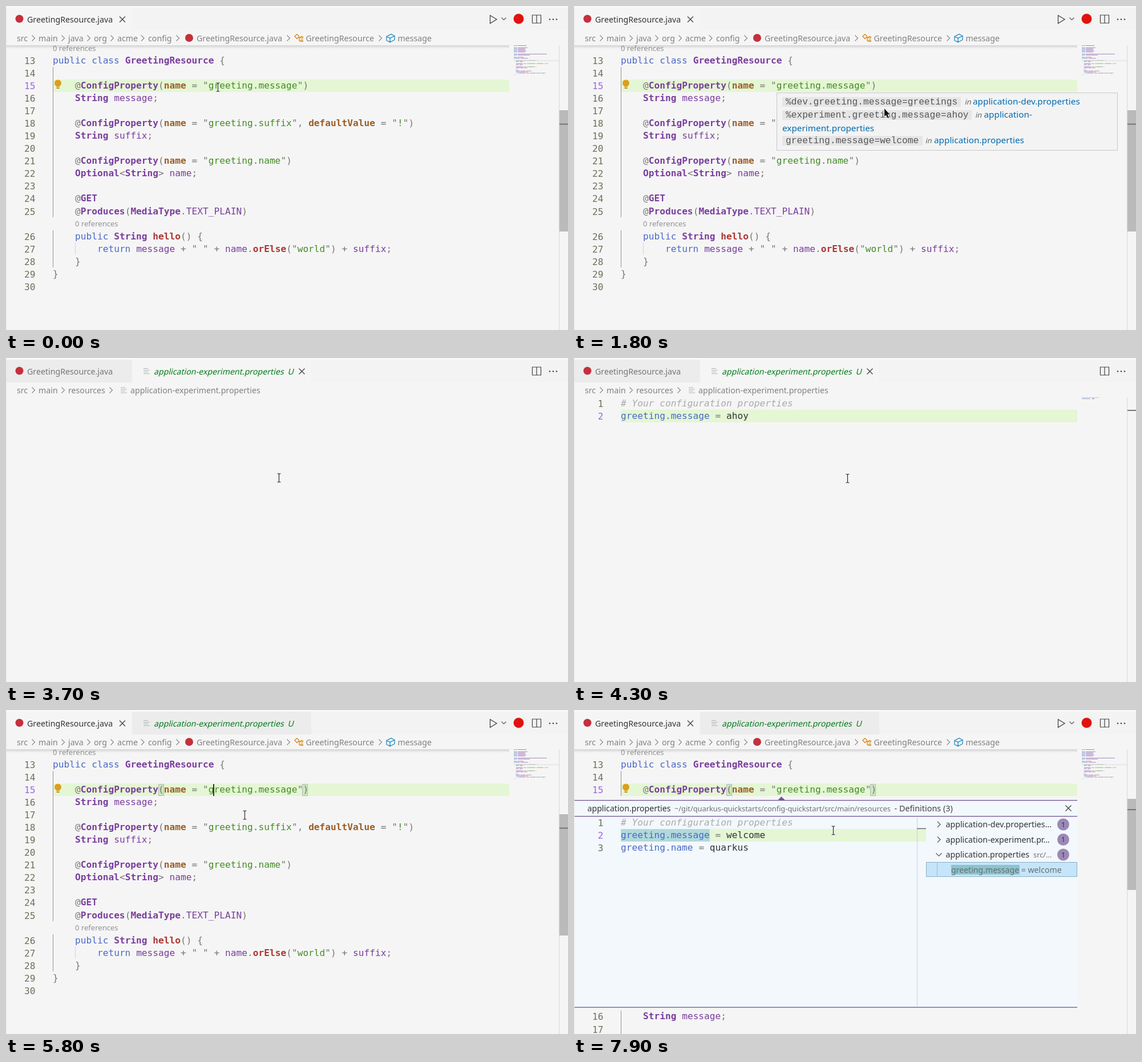
Recreate the animation shown at these times as an HTML page with a canvas. Size 985x569 px, loop 8 s.

```html
<!DOCTYPE html>
<html lang="en">
<head>
<meta charset="utf-8">
<title>Config property editor</title>
<style>
html, body { margin: 0; width: 100%; height: 100%; overflow: hidden; background: #f5f5f5; }
canvas { display: block; }
</style>
</head>
<body>
<canvas id="stage" width="985" height="569"></canvas>
<script>
const ctx = document.getElementById('stage').getContext('2d');
const UI = '"Noto Sans", "Open Sans", sans-serif';
const MONO = '"DejaVu Sans Mono", monospace';
const CODE = '"Liberation Mono", monospace';
const CH = 9.742, ROW = 22.06, LEFT = 82;
const PURPLE = '#705697', GREEN_ROW = '#e4f6d4', GREY = '#777777', BG = '#f5f5f5';

// Token styles: first letter of each "~" separated piece
const STYLES = {
  k: ['#4b69c6'], T: ['#7a3e9d', 'bold'], v: ['#7a3e9d'], p: [GREY],
  s: ['#448c27'], n: ['#9c5d27', 'bold'], f: ['#aa3731', 'bold'],
  c: ['#aaaaaa', 'italic'], x: ['#333333']
};
const config = (key, rest = '') =>
  `p    @~TConfigProperty~p(~nname~p = "~s${key}~p"${rest}~p)`;
const LINES = {
  13: 'kpublic class ~TGreetingResource~p {',
  15: config('greeting.message'),
  16: 'p    ~TString~v message~p;',
  18: config('greeting.suffix', ', ~ndefaultValue~p = "~s!~p"'),
  19: 'p    ~TString~v suffix~p;',
  21: config('greeting.name'),
  22: 'p    ~TOptional~p<~TString~p> ~vname~p;',
  24: 'p    @~TGET',
  25: 'p    @~TProduces~p(~TMediaType~p.~vTEXT_PLAIN~p)',
  26: 'p    ~kpublic ~TString ~fhello~p() {',
  27: 'p        ~kreturn ~vmessage~p + " " + ~vname~p.~forElse~p("~sworld~p") + ~vsuffix~p;',
  28: 'p    }',
  29: 'p}'
};
const COMMENT = 'c# Your configuration properties';
const pair = (key, value) => `k${key}~p = ~x${value}`;

function rect(x, y, w, h, color) {
  ctx.fillStyle = color;
  ctx.fillRect(x, y, w, h);
}

function frame(x, y, w, h, color) {
  ctx.strokeStyle = color;
  ctx.lineWidth = 1;
  ctx.strokeRect(x + .5, y + .5, w - 1, h - 1);
}

function disc(x, y, r, color) {
  ctx.fillStyle = color;
  ctx.beginPath();
  ctx.arc(x, y, r, 0, 7);
  ctx.fill();
}

function shape(path, x, y, stroke, fill, width = 1.2) {
  ctx.save();
  ctx.translate(x, y);
  const p = new Path2D(path);
  if (fill) { ctx.fillStyle = fill; ctx.fill(p); }
  if (stroke) { ctx.strokeStyle = stroke; ctx.lineWidth = width; ctx.stroke(p); }
  ctx.restore();
}

function text(str, x, y, color, size = 14.2, family = UI, weight = '') {
  ctx.font = `${weight} ${size}px ${family}`;
  ctx.fillStyle = color;
  ctx.fillText(str, x, y);
}

function slanted(str, x, y, color, size) {
  ctx.save();
  ctx.transform(1, 0, -.24, 1, x, y);
  text(str, 0, 0, color, size);
  ctx.restore();
}

function tokens(line, draw) {
  let col = 0;
  for (const part of line.split('~')) {
    const str = part.slice(1), [color, weight] = STYLES[part[0]];
    draw(str, col, color, weight);
    col += str.length;
  }
}

const codeLine = (line, y) => tokens(line, (str, col, color, weight) =>
  text(str, LEFT + col * CH, y, color, 16.18, MONO, weight));

function lineNumber(n, y, active) {
  ctx.textAlign = 'right';
  text(n, 51.5, y + .7, active ? '#9769dc' : '#6d705b', 16.18, MONO);
  ctx.textAlign = 'left';
}

const cross = (x, y) => shape('M-5 -5L5 5M5 -5L-5 5', x, y, '#424242', null, 1.3);
const chevron = (x, y, color = '#888') => shape('M-2.5 -5L2.5 0L-2.5 5', x, y, color);
const chevronDown = (x, y, s = 1, color = '#555') =>
  shape(`M${-5 * s} ${-2.5 * s}L0 ${2.5 * s}L${5 * s} ${-2.5 * s}`, x, y, color);
const fileIcon = (x, y) =>
  [8, 11, 8, 11].forEach((w, i) => rect(x, y + i * 3, w, 1, '#aeb4b6'));

function crumbs(names, arrows) {
  for (const [str, x] of names) text(str, x, 61.5, '#808080');
  for (const x of arrows) chevron(x, 56.5);
}

function header(javaActive, secondTab) {
  rect(0, 0, 985, 43, '#f3f3f3');
  rect(0, 0, 985, 3, '#f8f8f8');
  rect(1, 3, 220, 40, javaActive ? BG : '#ececec');
  disc(23.5, 22.5, 7, '#c4313c');
  text('GreetingResource.java', 37, 29, javaActive ? '#333' : '#747474');
  if (secondTab) {
    rect(221, 3, 314, 40, javaActive ? '#ececec' : BG);
    fileIcon(241, 18);
    slanted('application-experiment.properties', 259, 29, '#007a18');
    slanted('U', 493.5, 29, '#007a18');
  }
  cross(javaActive ? 204 : 518.5, 23.5);
  if (javaActive) {
    shape('M-5.5 -7L6 0L-5.5 7Z', 854, 23.5, '#424242', null, 1.3);
    chevronDown(872.5, 22.5, .8);
    disc(898.5, 22.5, 9, '#e0140f');
  }
  shape('M-7.5 -7H7.5V7H-7.5ZM0 -7V7', 930, 23, '#424242', null, 1.2);
  for (const x of [953, 959, 965]) disc(x, 23.5, 1.3, '#424242');
}

function javaCrumbs() {
  crumbs([['src', 19], ['main', 57], ['java', 109], ['org', 154], ['acme', 195],
    ['config', 249], ['GreetingResource.java', 334], ['GreetingResource', 525.5],
    ['message', 686.5]], [48, 100, 145, 186, 239.5, 301, 495, 656]);
  disc(321, 56, 7, '#c4313c');
  shape('M-7 -3L-3 -7L1 -3L-3 1ZM-1 -1H4M1 -1V5H4M4 -3L7 -3L7 0L4 0ZM4 3H7V6H4Z',
    513, 56.5, '#d67e00');
  shape('M-7 -3L1 -7L7 -4V3L-1 7L-7 4ZM-7 -3L-1 0L7 -4M-1 0V7', 674, 56.5, '#0a7fc0');
}

function minimap() {
  ctx.globalAlpha = .6;
  const heads = [22, 0, 24, 20, 20, 22, 20, 0, 58, 28, 0, 17];
  heads.forEach((w, i) => {
    const y = 69 + i * 1.86;
    rect(890, y, Math.min(w, 6), 1, '#4b69c6');
    rect(897, y, Math.max(0, w - 7), 1, '#7a3e9d');
  });
  for (const n in LINES) tokens(LINES[n], (str, col, color) => {
    const pad = str.length - str.trimStart().length;
    rect(890 + (col + pad) * .92, 69 + (n - 1) * 1.86, (str.length - pad) * .8, 1, color);
  });
  ctx.globalAlpha = 1;
  rect(890, 95.5, 79, 1, '#dcdcdc');
}

function scrollbar(top, bottom, mark, color = '#bababa') {
  rect(969, 69, 1, 500, '#d8d8d8');
  if (bottom) rect(970, top, 15, bottom - top, color);
  rect(970, mark, 15, 2, '#757575');
}

function bulb() {
  disc(91, 135.5, 6, '#dd9f1b');
  rect(88, 139, 6, 3, '#dd9f1b');
  rect(88.5, 143, 5, 2, '#b28a3a');
}

function bracket(x) {
  rect(x, 130, 10, 21, 'rgba(0,100,0,.1)');
  frame(x, 130, 10, 21, '#b9b9b9');
}

function javaEditor(t) {
  const peek = t >= 6600, focused = t >= 4700;
  javaCrumbs();
  rect(LEFT, 129.5, 800, 21.5, GREEN_ROW);
  rect(82, 107, 1, peek ? 44 : 264, '#949494');
  if (peek) rect(82, 528, 1, 41, '#949494');
  else {
    rect(82, 394, 1, 65, '#949494');
    rect(121, 415, 1, 22, '#d3d3d3');
    text('0 references', 121, 387, '#919191', 13.05);
  }
  text('0 references', 82, 79, '#919191', 13.05);
  if (focused) { bracket(267); bracket(519); }
  for (let n = 13; n <= (peek ? 17 : 30); n++) {
    const shift = peek && n > 15 ? 376.5 : n > 25 ? ROW : 0;
    const y = Math.round(100.8 + (n - 13) * ROW + shift);
    lineNumber(n, y, n === 15);
    if (LINES[n]) codeLine(LINES[n], y);
  }
  if (!focused || t >= 5500) bulb();
  const caret = t >= 4700 && t < 5100 || t >= 5600 && t < 6200;
  if (caret) rect(363, 130, 2, 21, '#333');
  const fade = ctx.createLinearGradient(0, 69, 0, 75);
  fade.addColorStop(0, 'rgba(0,0,0,.14)');
  fade.addColorStop(1, 'rgba(0,0,0,0)');
  rect(0, 69, 882, 6, fade);
  minimap();
  if (peek) scrollbar(156, 316, 174);
  else scrollbar(183, 396, 206.5, t === 4700 ? '#dedede' : undefined);
  if (t >= 300 && t < 3700) hover();
  if (peek) peekView(t);
}

function hover() {
  rect(355, 152, 598, 102, '#f3f3f3');
  frame(355, 152, 598, 102, '#c8c8c8');
  const link = (str, x, y) => text(str, x, y, '#006ab1', 15.3);
  const row = (str, y, bg, width, inX, target, x) => {
    rect(365, bg, width, 17, '#e6e6e6');
    text(str, 371, y, '#555', 16.2, CODE);
    slanted('in', inX, y, '#616161', 12.9);
    link(target, x, y);
  };
  row('%dev.greeting.message=greetings', 173, 160, 313, 684.5, 'application-dev.properties', 699);
  row('%experiment.greeting.message=ahoy', 196, 183, 332, 703, 'application-', 718.5);
  link('experiment.properties', 365, 219.5);
  row('greeting.message=welcome', 241, 228, 246, 615.5, 'application.properties', 631);
}

function peekView(t) {
  rect(1, 158, 881, 365, '#f2f8fc');
  shape('M-7 0L0 -7L7 0Z', 363.5, 159, null, PURPLE);
  for (const y of [158, 186, 521.5]) rect(1, y, 881, 1.3, PURPLE);
  text('application.properties', 23.5, 178, '#333', 14.15);
  text('~/git/quarkus-quickstarts/config-quickstart/src/main/resources', 176, 178, '#717171', 12.82);
  text('- Definitions (3)', 561.5, 178, '#444', 14.4);
  cross(866.5, 172.5);
  if (t < 6700) return;

  rect(LEFT, 209, 535, 22, GREEN_ROW);
  rect(LEFT, 209, 16 * CH, 22, '#b1d9dc');
  const rows = [COMMENT, pair('greeting.message', 'welcome'), pair('greeting.name', 'quarkus')];
  rows.forEach((line, i) => {
    const y = Math.round(202.8 + i * ROW);
    lineNumber(i + 1, y, i === 1);
    codeLine(line, y);
  });
  rect(601, 187, 1, 334, '#cbd0d3');
  rect(601, 207.5, 16, 1.6, '#757575');

  ['application-dev.properties…', 'application-experiment.pr…', 'application.properties'].forEach((str, i) => {
    const y = 201 + i * 26.5;
    if (i < 2) chevron(639.5, y, '#555');
    else chevronDown(639.5, y);
    text(str, 651.5, y + 5, '#333');
    disc(857.5, y, 10.5, '#9b89b6');
    text('1', 854, y + 4.5, '#333', 12.5);
  });
  text('src/…', 805, 259, '#717171', 12.82);
  rect(617, 267, 265, 26, '#c5e5fb');
  frame(617, 267, 265, 26, '#8faec4');
  rect(636, 267, 1, 26, '#a9b9c4');
  rect(661, 272, 120, 17, '#8ac5d0');
  text('greeting.message = welcome', 661, 285.5, '#6c6c6c', 14.1);
}

function propertiesEditor(t) {
  crumbs([['src', 19], ['main', 57], ['resources', 109],
    ['application-experiment.properties', 218]], [48, 100, 184]);
  fileIcon(201, 51.5);
  if (t < 3800) return;
  rect(LEFT, 91, 800, 22, GREEN_ROW);
  [COMMENT, pair('greeting.message', 'ahoy')].forEach((line, i) => {
    const y = Math.round(84.6 + i * ROW);
    lineNumber(i + 1, y, i === 1);
    codeLine(line, y);
  });
  if (t < 4300) rect(306, 91, 2, 22, '#333');
  ctx.globalAlpha = .6;
  rect(890, 69, 30, 1, '#aaa');
  rect(890, 71, 15, 1, '#4b69c6');
  rect(908, 71, 4, 1, '#333');
  ctx.globalAlpha = 1;
  scrollbar(0, 0, 91);
}

// Pointer stops: time, x, y
const PATH = [[0, 371, 143], [200, 355, 141], [500, 355, 141], [600, 355, 140],
  [900, 355, 140], [1800, 544, 180], [2400, 629, 192], [2800, 629, 192],
  [2900, 477, 210], [3000, 477, 210], [3100, 478, 211], [3900, 478, 211],
  [4000, 479, 212], [5200, 479, 212], [5700, 418, 185], [7800, 418, 185],
  [7900, 454, 212], [8000, 454, 212]];
const HAND = 'M-1 -1Q1 -2 2 0V4L9 6Q11 7 10 10L8 14H0L-5 9Q-6 7 -4 7L-1 8Z';
const ARROW = 'M0 0V14L3 11.5L6 17L8 16L5.5 10.5H9.5Z';
const BEAM = 'M-3 -7.5H-1L0 -6.5L1 -7.5H3M0 -6.5V6.5M-3 7.5H-1L0 6.5L1 7.5H3';

function pointer(t) {
  const i = PATH.findIndex(p => p[0] > t);
  const [t0, x0, y0] = PATH[i - 1], [t1, x1, y1] = PATH[i];
  const k = (t - t0) / (t1 - t0);
  const x = Math.round(x0 + (x1 - x0) * k), y = Math.round(y0 + (y1 - y0) * k);
  const onLink = t >= 2900 && t < 3700 || t >= 6600 && t < 7900;
  const onHover = t >= 1000 && t < 2900 && y > 152;
  if (onLink || onHover) {
    const path = onLink ? HAND : ARROW;
    shape(path, x, y, '#fff', null, 1.5);
    shape(path, x, y, null, '#111');
  } else {
    shape(BEAM, x + .5, y - .5, 'rgba(255,255,255,.8)', null, 3);
    shape(BEAM, x + .5, y - .5, '#222');
  }
}

function draw(now) {
  const t = Math.floor(now % 8000 / 100) * 100;
  const java = t < 3700 || t >= 4700;
  rect(0, 0, 985, 569, BG);
  header(java, t >= 3700);
  if (java) javaEditor(t);
  else propertiesEditor(t);
  rect(0, 3, 1, 566, '#e7e7e7');
  pointer(t);
}

const start = performance.now();
function tick() {
  draw(performance.now() - start);
  requestAnimationFrame(tick);
}
tick();
</script>
</body>
</html>
```
